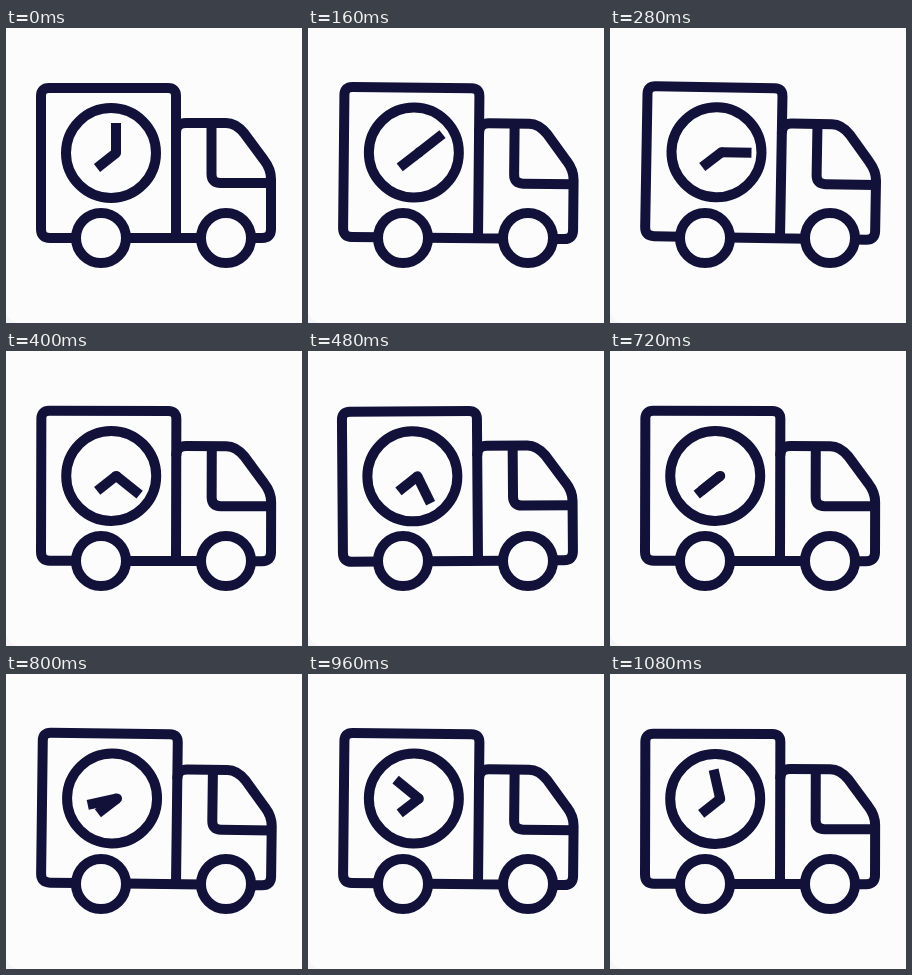
An HTML page for the animation above (1120 ms loop, 296x295 px).

```html
<!DOCTYPE html>
<html lang="en">
<head>
<meta charset="utf-8">
<title>Delivery truck</title>
<style>
  html, body { margin: 0; width: 100%; height: 100%; overflow: hidden; background: #f5f5f5; }
  svg { display: block; width: 100vw; height: 100vh; background: #fcfcfc; border-bottom-left-radius: 14px; }
  .ink { fill: none; stroke: #12113a; stroke-width: 10; stroke-linejoin: round; }
</style>
</head>
<body>
<svg viewBox="0 0 296 295" preserveAspectRatio="none">
  <g class="ink">
    <g id="body">
      <path d="M72 210H44Q35 210 35 201V68Q35 60 43 60H162Q170 60 170 68V210M118 210H197"/>
      <path d="M170 105Q170 95 180 95H220C228 95 233 99 238 105L258 132Q265 141 265 151V201Q265 210 256 210H243"/>
      <path d="M205.5 95V146Q205.5 155 214.5 155H265"/>
      <circle cx="105" cy="125" r="45"/>
      <path d="M110 125L91 140"/>
      <path id="minute" d="M110 125V95"/>
      <circle cx="110" cy="125" r="5" fill="#12113a" stroke="none"/>
    </g>
    <circle cx="95" cy="210" r="25"/>
    <circle cx="220" cy="210" r="25"/>
  </g>
</svg>
<script>
  const LOOP = 1120, STEP = 40;
  const TILTS = [0, 1, -1, 1, 0]; // degrees, evenly spaced over the loop
  const body = document.getElementById('body');
  const minute = document.getElementById('minute');

  function tiltAt(p) {
    const pos = p * (TILTS.length - 1);
    const i = Math.floor(pos);
    return TILTS[i] + (TILTS[i + 1] - TILTS[i]) * (pos - i);
  }

  function draw(ms) {
    const p = Math.floor((ms % LOOP) / STEP) * STEP / LOOP;
    body.setAttribute('transform', `rotate(${tiltAt(p)} 150 210)`);
    minute.setAttribute('transform', `rotate(${360 * p} 110 125)`);
  }

  const start = performance.now();
  function tick() {
    draw(performance.now() - start);
    requestAnimationFrame(tick);
  }
  tick();
</script>
</body>
</html>
```
